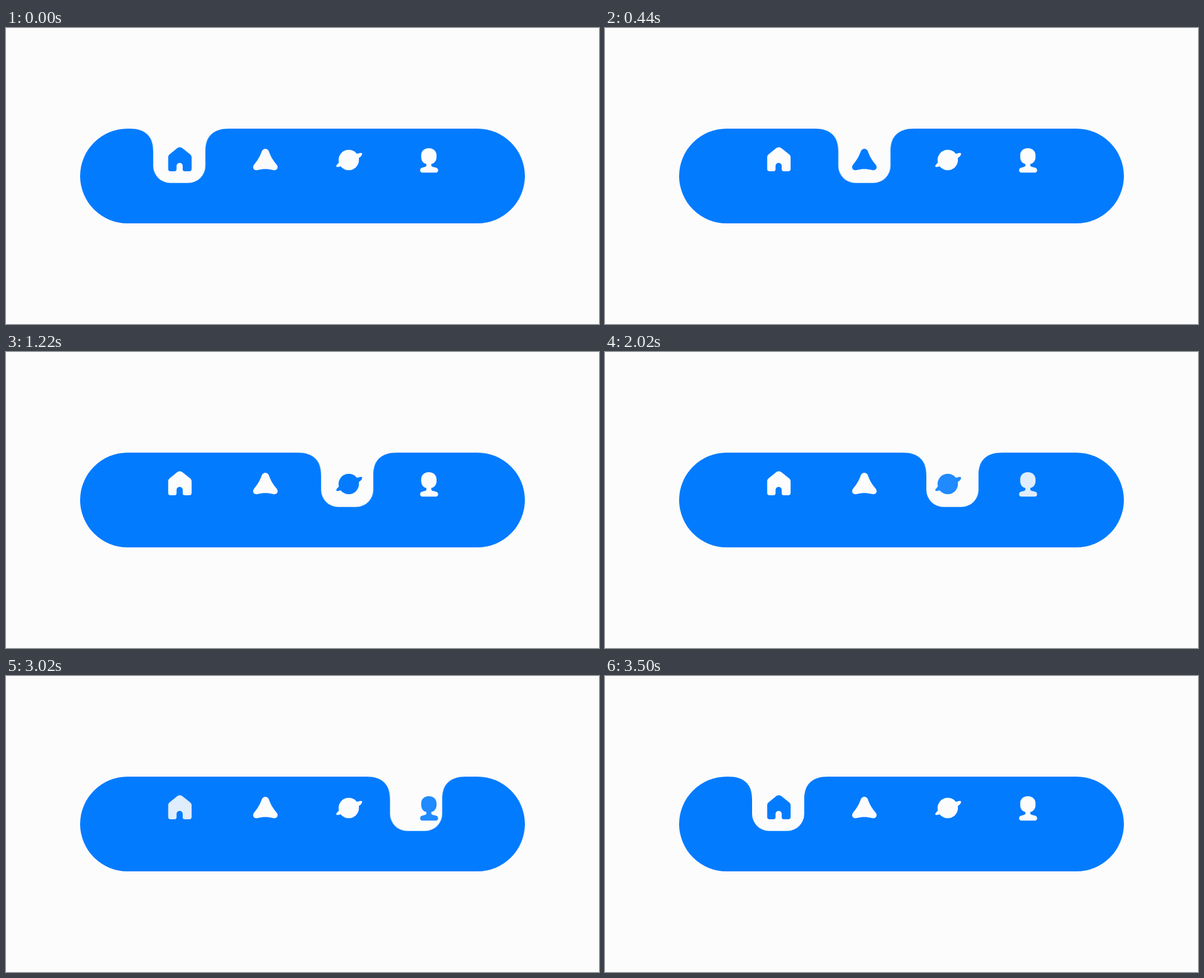
Write an HTML page without scripts that moves like this. It is 1000 by 500 pixels and loops after 4 s.

```html
<!DOCTYPE html>
<html lang="en">
<head>
<meta charset="utf-8">
<title>Tab bar</title>
<style>
  :root { --blue: #037bff; --light: #fcfcfc; }
  html, body { margin: 0; width: 100%; height: 100%; overflow: hidden; background: var(--light); }
  svg { display: block; width: 100%; height: 100%; }

  .bar { fill: var(--blue); }
  .notch { fill: var(--light); animation: slide 4s infinite; }
  .icon { fill: var(--light); animation: activate 4s linear var(--delay, 0s) infinite; }
  .home { --delay: -1s; }
  .planet { --delay: -3s; }
  .person { --delay: -2s; }

  /* Each move overshoots by 4% and then settles. */
  @keyframes slide {
    0%, 25%, 50%, 75% { animation-timing-function: cubic-bezier(.42, 0, .32, 1); }
    8%, 33%, 58%, 83% { animation-timing-function: cubic-bezier(.4, 0, .7, .8); }
    0% { transform: translateX(0); }
    8% { transform: translateX(150.8px); }
    12.5%, 25% { transform: translateX(145px); }
    33% { transform: translateX(292.7px); }
    37.5%, 50% { transform: translateX(287px); }
    58% { transform: translateX(426.4px); }
    62.5%, 75% { transform: translateX(421px); }
    83% { transform: translateX(-16.8px); }
    87.5%, 100% { transform: translateX(0); }
  }

  @keyframes activate {
    0%, 29.5%, 100% { fill: var(--light); }
    4.5%, 25% { fill: var(--blue); }
  }
</style>
</head>
<body>
<svg viewBox="0 0 1000 500">
  <rect class="bar" x="125" y="170" width="750" height="160" rx="80"/>

  <path class="notch" d="M208 169V170c27 0 40 13 40 38v25a29 29 0 0 0 29 28.8h30a29 29 0 0 0 29-28.8v-25c0-25 13-38 40-38V169Z"/>

  <path class="icon home" d="M273.5 218.5C273.5 216.5 274.3 214.8 275.8 213.6L288.3 203.3C291 201 295 201 297.8 203.3L310.6 213.6C312 214.8 313 216.5 313 218.5V238Q313 242 309 242H301.5Q298 242 298 238.5V233a5.2 5.2 0 0 0-10.4 0V238.5Q287.6 242 284 242H277.5Q273.5 242 273.5 238Z"/>

  <path class="icon" d="M431.3 208.5C433.5 202.5 441.2 202.5 443.4 208.5C446.3 216.5 449 222 456 230.3C460.5 235.8 457 241.5 450.5 240C441 237.8 433.5 237.8 424.3 240C417.8 241.5 414.3 235.8 418.8 230.3C425.5 222 428.3 216.5 431.3 208.5Z"/>

  <g class="icon planet">
    <circle cx="578" cy="223" r="17.2"/>
    <path d="M590 213L597.5 211C600.3 210.5 601.3 212 600 214.5C599 216.8 596.5 219 593.5 220.7Z"/>
    <path d="M562 226.5L558 231C556 233.5 557 235.2 559.8 234.8L567 233.3Z"/>
  </g>

  <path class="icon person" d="M713 203C721 203 726 208 726 215V218C726 225 721.5 229 717.5 229.5C716.8 231 717 234 719.5 234.6L724.5 235.7C727 236.2 728.7 238 728.7 240.2C728.7 242.6 727 244.2 724.7 244.2H702.3C700 244.2 698.3 242.6 698.3 240.2C698.3 238 700 236.2 702.4 235.7L707 234.6C709.2 234 709.3 231 708.6 229.5C704.5 229 700.2 225 700.2 218V215C700.2 208 705 203 713 203Z"/>
</svg>
</body>
</html>
```
